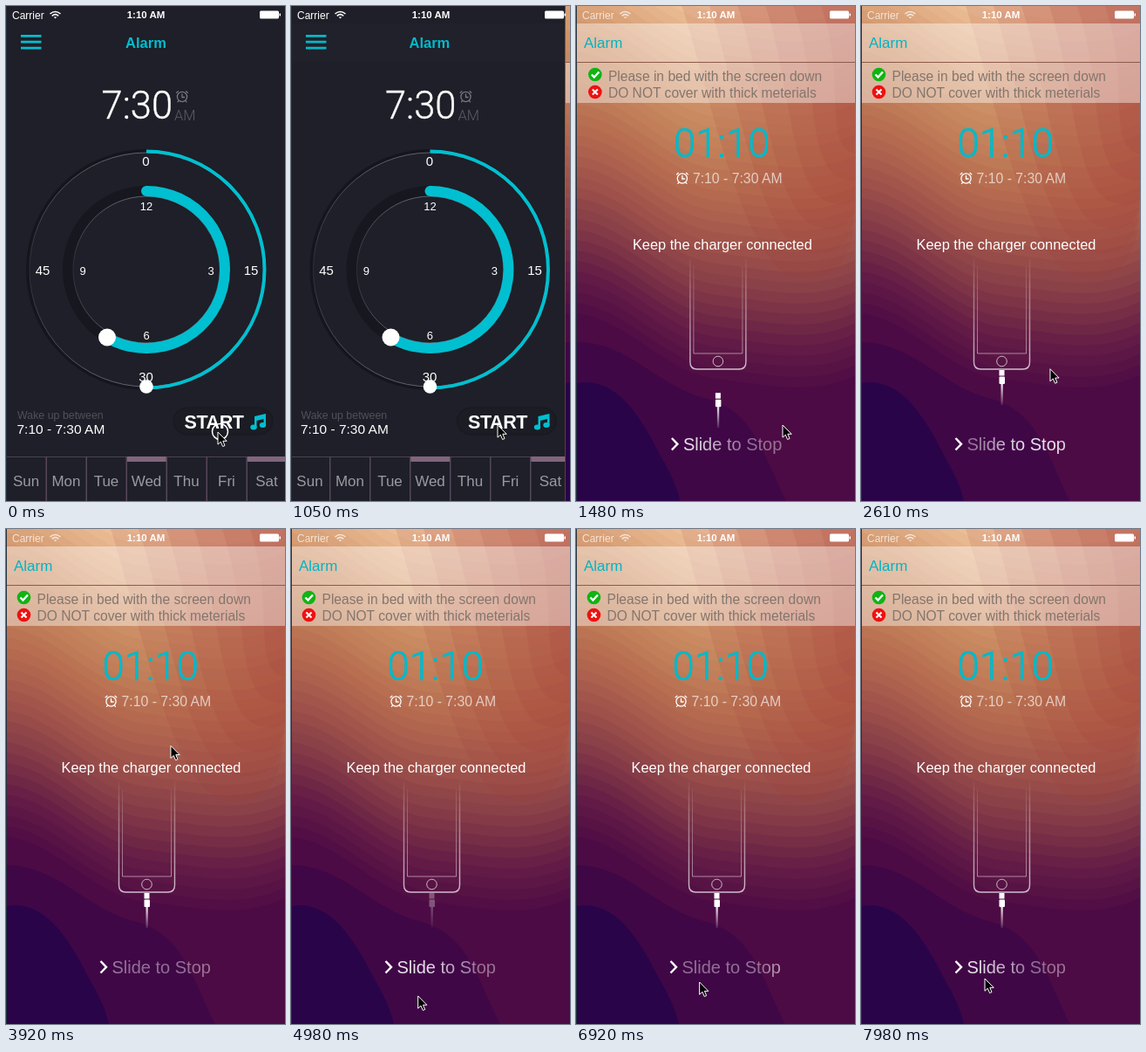
Recreate the animation shown at these times as an HTML page. Size 320x567 px, loop 8 s.

```html
<!DOCTYPE html>
<html lang="en">
<head>
<meta charset="utf-8">
<title>Alarm</title>
<style>
html, body { margin: 0; width: 100%; height: 100%; overflow: hidden; background: #1e1f28; }
svg { display: block; width: 320px; height: 567px; }
text { font-family: "Liberation Sans", Arial, sans-serif; fill: #fff; }
.light { font-family: Roboto, "Open Sans", sans-serif; font-weight: 300; }
.mid { text-anchor: middle; }
.bold { font-weight: 700; }
.line { fill: none; stroke: #fff; }
.cyan { fill: #00bfd0; }
.note { fill: #83766d; }
</style>
</head>
<body>
<svg viewBox="0 0 320 567" xmlns="http://www.w3.org/2000/svg">
  <defs>
    <linearGradient id="phoneFade" gradientUnits="userSpaceOnUse" x1="0" y1="286" x2="0" y2="416">
      <stop offset="0" stop-color="#fff" stop-opacity="0"/>
      <stop offset=".3" stop-color="#fff" stop-opacity=".3"/>
      <stop offset="1" stop-color="#fff" stop-opacity=".72"/>
    </linearGradient>
    <linearGradient id="wire" gradientUnits="userSpaceOnUse" x1="0" y1="16" x2="0" y2="40">
      <stop offset="0" stop-color="#fff" stop-opacity=".9"/>
      <stop offset="1" stop-color="#fff" stop-opacity=".1"/>
    </linearGradient>
    <linearGradient id="shine" gradientUnits="userSpaceOnUse" y1="0" y2="0">
      <stop offset="0" stop-color="#fff" stop-opacity=".42"/>
      <stop offset=".4" stop-color="#fff" stop-opacity=".88"/>
      <stop offset=".6" stop-color="#fff" stop-opacity=".88"/>
      <stop offset="1" stop-color="#fff" stop-opacity=".42"/>
    </linearGradient>
    <linearGradient id="rim" x1="0" y1="0" x2="0" y2="1">
      <stop offset="0" stop-color="#60616a"/><stop offset=".5" stop-color="#2b2c35"/>
      <stop offset="1" stop-color="#60616a"/>
    </linearGradient>
    <g id="clock" fill="none" stroke-width="1.3" stroke-linecap="round">
      <circle r="5.6"/>
      <path d="M0 -3V.5H2.6M-6.4 -4.6L-4.6 -6.3M6.4 -4.6L4.6 -6.3M-4 4.6L-5 5.8M4 4.6L5 5.8"/>
    </g>
  </defs>

  <rect width="320" height="567" fill="#1e1f28"/>

  <g id="home">
    <text class="light" x="109.5" y="129" font-size="43.5" stroke="#fff" stroke-width=".4">7:30</text>
    <use href="#clock" x="202" y="104" stroke="#777780"/>
    <text class="light" x="193" y="131" font-size="16.5" style="fill:#5a5b64">AM</text>

    <g fill="none">
      <circle cx="161" cy="302" r="136" stroke="#15161d" stroke-width="4"/>
      <circle cx="161" cy="302" r="134" stroke="url(#rim)"/>
      <circle cx="161" cy="302" r="90" stroke="#16171f" stroke-width="12"/>
      <circle cx="161" cy="302" r="84" stroke="url(#rim)"/>
      <path id="outer" stroke="#00bfd0" stroke-width="4"/>
      <path id="inner" stroke="#00bfd0" stroke-width="12" stroke-linecap="round"/>
    </g>
    <g id="dial"></g>
    <circle cx="161" cy="436" r="7.8" fill="#fff"/>
    <circle cx="116" cy="379.5" r="10" fill="#fff"/>

    <text x="13" y="473" font-size="12.4" style="fill:#50515a">Wake up between</text>
    <text x="12.5" y="490" font-size="15.5">7:10 - 7:30 AM</text>
    <rect x="192" y="460" width="114" height="31" rx="15.5" fill="#1b1c24" stroke="#17181f"/>
    <text class="bold" x="204.5" y="483.5" font-size="21.5" letter-spacing="-.4">START</text>
    <g class="cyan">
      <path d="M285 470L298 467V480H295.5V473L287.5 475V483H285Z"/>
      <ellipse cx="284" cy="482.5" rx="3.7" ry="2.9"/>
      <ellipse cx="294.5" cy="480" rx="3.7" ry="2.9"/>
    </g>
    <g id="days"></g>
    <rect id="dim" x="-100" width="520" height="567" fill="#000" opacity="0"/>
  </g>

  <g id="sleep">
    <g id="waves"></g>
    <path d="M0 385C60 385 90 435 150 450C205 465 215 520 240 567H0Z" fill="#400747"/>
    <path d="M0 432C40 425 65 460 85 495C100 525 112 540 118 567H0Z" fill="#2a0449"/>

    <rect y="64" width="321" height="1" fill="#8d5b4b"/>
    <rect y="65" width="321" height="46" fill="#fff" opacity=".42"/>
    <circle cx="20.5" cy="78.5" r="7.8" fill="#10b414"/>
    <path class="line" d="M16.5 78.5L19.5 81.5L25 75.5" stroke-width="2.4"/>
    <circle cx="20.5" cy="98.5" r="7.8" fill="#ee1111"/>
    <path class="line" d="M17.5 95.5L23.5 101.5M23.5 95.5L17.5 101.5" stroke-width="2.2"/>
    <g font-size="15.6">
      <text class="note" x="35.5" y="86">Please in bed with the screen down</text>
      <text class="note" x="35.5" y="105">DO NOT cover with thick meterials</text>
    </g>

    <text class="light" x="110.5" y="173" font-size="45.5" style="fill:#00bacb" stroke="#00bacb" stroke-width=".7">01:10</text>
    <use href="#clock" x="120.5" y="197.5" stroke="#fff"/>
    <text x="132.5" y="203" font-size="15.8" fill-opacity=".66">7:10 - 7:30 AM</text>
    <text x="63.5" y="279" font-size="16.4">Keep the charger connected</text>

    <g fill="none" stroke="url(#phoneFade)">
      <path d="M129.5 288V408Q129.5 416 137.5 416H185.5Q193.5 416 193.5 408V288" stroke-width="1.4"/>
      <path d="M133.5 298.5V398H189.5V298.5" opacity=".75"/>
      <circle cx="161.5" cy="407" r="5.8"/>
    </g>
    <g id="cable" fill="#fff">
      <rect x="158.5" width="6" height="6.5"/>
      <rect x="158.5" y="7.5" width="6.5" height="8.5" rx="1"/>
      <rect x="160.5" y="16" width="2.3" height="24" fill="url(#wire)"/>
    </g>
    <path class="line" d="M108.5 495L115 501.8L108.5 508.5" stroke-width="2.4"/>
    <text x="121.5" y="509" font-size="20" style="fill:url(#shine)">Slide to Stop</text>
  </g>

  <rect id="nav" y="20" width="320" height="44" fill="#fff" opacity="0"/>
  <path id="menu" d="M17 34.3H40.5M17 41.2H40.5M17 48.1H40.5" stroke="#00bfd0" stroke-width="2.8"/>
  <text id="title" class="bold mid" style="fill:#00bfd0" y="48" font-size="16.5">Alarm</text>
  <text id="back" x="9" y="48" font-size="17" style="fill:#00b4c4">Alarm</text>

  <g id="carrier">
    <text x="7" y="14.5" font-size="12">Carrier</text>
    <g class="line" stroke-width="1.6">
      <path d="M50.5 9Q56.5 4 62.5 9M52.8 11.3Q56.5 8 60.2 11.3"/>
      <path d="M54.7 12.5H58.3L56.5 14.5Z" fill="#fff" stroke="none"/>
    </g>
  </g>
  <text class="bold mid" x="160.5" y="14.3" font-size="11.5">1:10 AM</text>
  <rect x="291" y="5.5" width="22" height="9" rx="1.5" fill="#fff"/>
  <rect x="313.5" y="8.5" width="1.5" height="3" fill="#fff"/>

  <circle id="ring" class="line" cx="245.5" cy="487.5" r="9" stroke-width="1.5"/>
  <path id="cursor" d="M0 0V14.2L3.3 11.2L5.6 16.5L8 15.5L5.8 10.3H10.2Z" fill="#000" stroke="#fff"/>
  <rect width="1" height="567" fill="#22323f"/>
</svg>
<script>
const LOOP = 8000, PUSH = 1040;
const $ = id => document.getElementById(id);
const set = (id, attrs) => {
  for (const key in attrs) $(id).setAttribute(key, attrs[key]);
};
const clamp = v => Math.max(0, Math.min(1, v));

// Clockwise arc from twelve o'clock
function arc(radius, degrees) {
  const a = degrees * Math.PI / 180;
  const x = 161 + radius * Math.sin(a), y = 302 - radius * Math.cos(a);
  return `M161 ${302 - radius}A${radius} ${radius} 0 ${degrees > 180 ? 1 : 0} 1 ${x} ${y}`;
}

function buildHome() {
  set('outer', { d: arc(135.5, 180) });
  set('inner', { d: arc(90, 210) });

  const label = (text, x, y, size) =>
    `<text class="mid" x="${x}" y="${y}" font-size="${size}">${text}</text>`;
  $('dial').innerHTML =
    label(0, 160.5, 183, 15) + label(15, 281, 308, 15) +
    label(30, 160.5, 430, 15) + label(45, 42, 308, 15) +
    label(12, 161, 234, 13) + label(3, 235, 307.5, 13) +
    label(6, 161, 382, 13) + label(9, 88, 307.5, 13);

  let days = '<rect y="516" width="420" height="1" fill="#4b4250"/>';
  ['Sun', 'Mon', 'Tue', 'Wed', 'Thu', 'Fri', 'Sat'].forEach((day, i) => {
    const x = i * 46;
    if (day === 'Wed' || day === 'Sat') {
      days += `<rect x="${x}" y="516" width="46" height="6" fill="#80667c"/>`;
    }
    if (i) days += `<rect x="${x - .5}" y="516" width="1.5" height="51" fill="#56475a"/>`;
    days += `<text class="mid" x="${x + 23}" y="549.5" font-size="17" style="fill:#9a9aa2">${day}</text>`;
  });
  $('days').innerHTML = days;
}

// Wallpaper tones from the top edge down to the purple floor
const tones = ['f0c49c', 'dfab82', 'cf9268', 'c28059', 'b56a4f', 'a0544a', '843b47', '651d46', '4d0b45'];

function tone(v) {
  const i = Math.min(Math.floor(v), tones.length - 2);
  const channel = (hex, c) => parseInt(hex.substr(c * 2, 2), 16);
  const mix = c => {
    const a = channel(tones[i], c), b = channel(tones[i + 1], c);
    return Math.round(a + (b - a) * (v - i));
  };
  return `rgb(${mix(0)},${mix(1)},${mix(2)})`;
}

function buildWaves() {
  let out = `<rect width="321" height="567" fill="${tone(0)}"/>`;
  const bands = 36;
  for (let i = 0; i <= bands; i++) {
    const y = 12 * i - 80;
    out += `<path d="M0 ${y}C60 ${y + 8} 100 ${y + 68} 160 ${y + 75}S270 ${y + 95} 321 ${y + 70}V567H0Z" fill="${tone(i * 8 / bands)}"/>`;
  }
  // Nested red lobes on the right
  for (let i = 0; i < 6; i++) {
    const x = 120 + 32 * i, y = 310 - 28 * i;
    out += `<path d="M${x} 0C${x + 30} 90 ${190 + 18 * i} ${y - 10} ${250 + 14 * i} ${y}S321 ${y - 40} 321 ${y - 110}V0Z" fill="#9a3034" opacity=".12"/>`;
  }
  $('waves').innerHTML = out;
}

// Pointer stops: time, x, y
const stops = [
  [0, 243, 488], [879, 243, 488], [880, 237, 480], [2350, 237, 480],
  [2610, 217, 416], [2700, 213, 388], [3150, 196, 184], [3400, 192, 190],
  [3580, 190, 212], [3920, 189, 248], [4440, 165, 390], [5000, 145, 540],
  [5330, 139, 515], [6250, 139, 515], [6500, 141, 519], [7180, 142, 519],
  [7400, 142, 515], [LOOP, 142, 515]
];

function pointer(t) {
  const i = stops.findIndex(s => s[0] > t);
  const [t0, x0, y0] = stops[i - 1], [t1, x1, y1] = stops[i];
  const k = (t - t0) / (t1 - t0);
  return `translate(${x0 + (x1 - x0) * k} ${y0 + (y1 - y0) * k})`;
}

// Remaining distance of a critically damped spring
function spring(t) {
  const k = Math.max(0, t - PUSH) * .0172;
  const rest = (1 + k) * Math.exp(-k);
  return rest < .002 ? 0 : rest;
}

function draw(t) {
  const rest = spring(t), p = 1 - rest;
  set('home', { transform: `translate(${-96 * p} 0)` });
  set('dim', { opacity: .1 * p });
  set('sleep', { transform: `translate(${320 * rest} 0)` });
  set('nav', { opacity: .42 * p });
  set('menu', { opacity: clamp(1 - 2 * p) });
  set('title', { x: 160.5 - 102 * p, opacity: rest * rest });
  set('back', { opacity: p });
  set('carrier', { opacity: 1 - .3 * clamp((p - .85) / .15) });

  const age = t < 1100 ? 0 : (t - 1100) % 4000;
  const lift = (1 - Math.cos(Math.PI * clamp((age - 70) / 1150))) / 2;
  set('cable', {
    transform: `translate(0 ${448.5 - 31.5 * lift})`,
    opacity: Math.min(clamp(age / 320), clamp((4000 - age) / 400))
  });

  // Shimmer band crossing the slide label, trailing behind the push
  const mid = 115 + ((t + 2730) % 3230 - 980) * .08 - 200 * rest;
  set('shine', { x1: mid - 80, x2: mid + 80 });

  set('ring', { opacity: 1 - clamp((t - 80) / 440) });
  set('cursor', { transform: pointer(t) });
}

buildHome();
buildWaves();
function tick() {
  draw(performance.now() % LOOP);
  requestAnimationFrame(tick);
}
draw(0);
requestAnimationFrame(tick);
</script>
</body>
</html>
```
